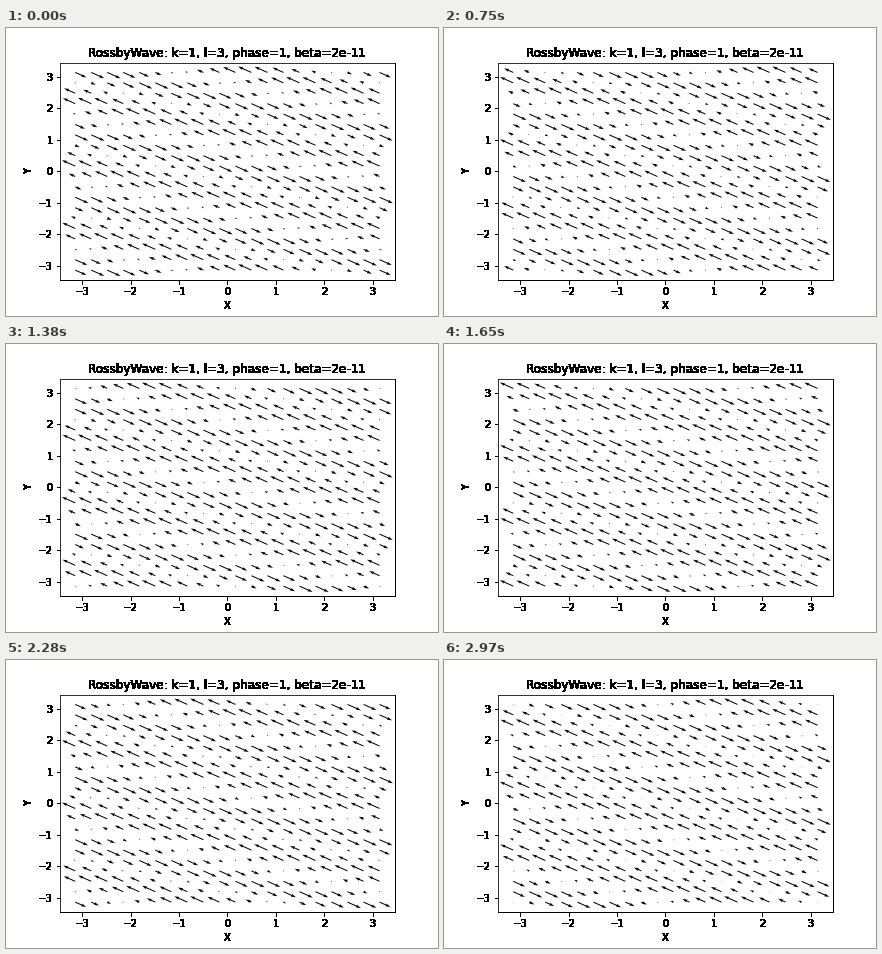
A matplotlib script for the animation above (3 s loop, 432x288 px).

```python
import numpy as np
import matplotlib.pyplot as plt
from matplotlib.animation import FuncAnimation

plt.rcParams.update({"font.family": "DejaVu Sans", "font.size": 10})

FRAMES, INTERVAL = 100, 30
K, L, PHASE, BETA = 1, 3, 1, 2e-11
OMEGA = -BETA * K / (K**2 + L**2)
DT = 9.05e10
SLOPE = 0.445

axis = np.linspace(-np.pi, np.pi, 20)
x, y = np.meshgrid(axis, axis)


def velocity(t):
    """Flow along the wave crests at time t."""
    s = np.sin(K * x + L * y - OMEGA * t + PHASE)
    return s, -SLOPE * s


def harden(img, dpi):
    """Turn every touched pixel solid black."""
    out = np.zeros_like(img)
    out[..., 3] = img[..., 3] > 0
    return out, 0, 0


fig, ax = plt.subplots(figsize=(6, 4), dpi=72, facecolor="white")
fig.subplots_adjust(left=0.125, right=0.9, bottom=0.125, top=0.88)

u, v = velocity(0)
scale = 1.8 * np.hypot(u, v).mean() * len(axis)
arrows = ax.quiver(x, y, u, v, scale=scale)

lim = 1.1 * np.pi
ax.set(xlim=(-lim, lim), ylim=(-lim, lim), xlabel="X", ylabel="Y",
       xticks=range(-3, 4), yticks=range(-3, 4))
ax.set_title(f"RossbyWave: k={K}, l={L}, phase={PHASE}, beta={BETA:.0e}")

for part in (ax.title, ax.xaxis, ax.yaxis,
             ax.spines["right"], ax.spines["bottom"]):
    part.set_agg_filter(harden)


def update(i):
    arrows.set_UVC(*velocity(i * DT))
    return arrows,


anim = FuncAnimation(fig, update, frames=FRAMES, interval=INTERVAL,
                     repeat=True, repeat_delay=0, blit=False)
plt.show()
```
